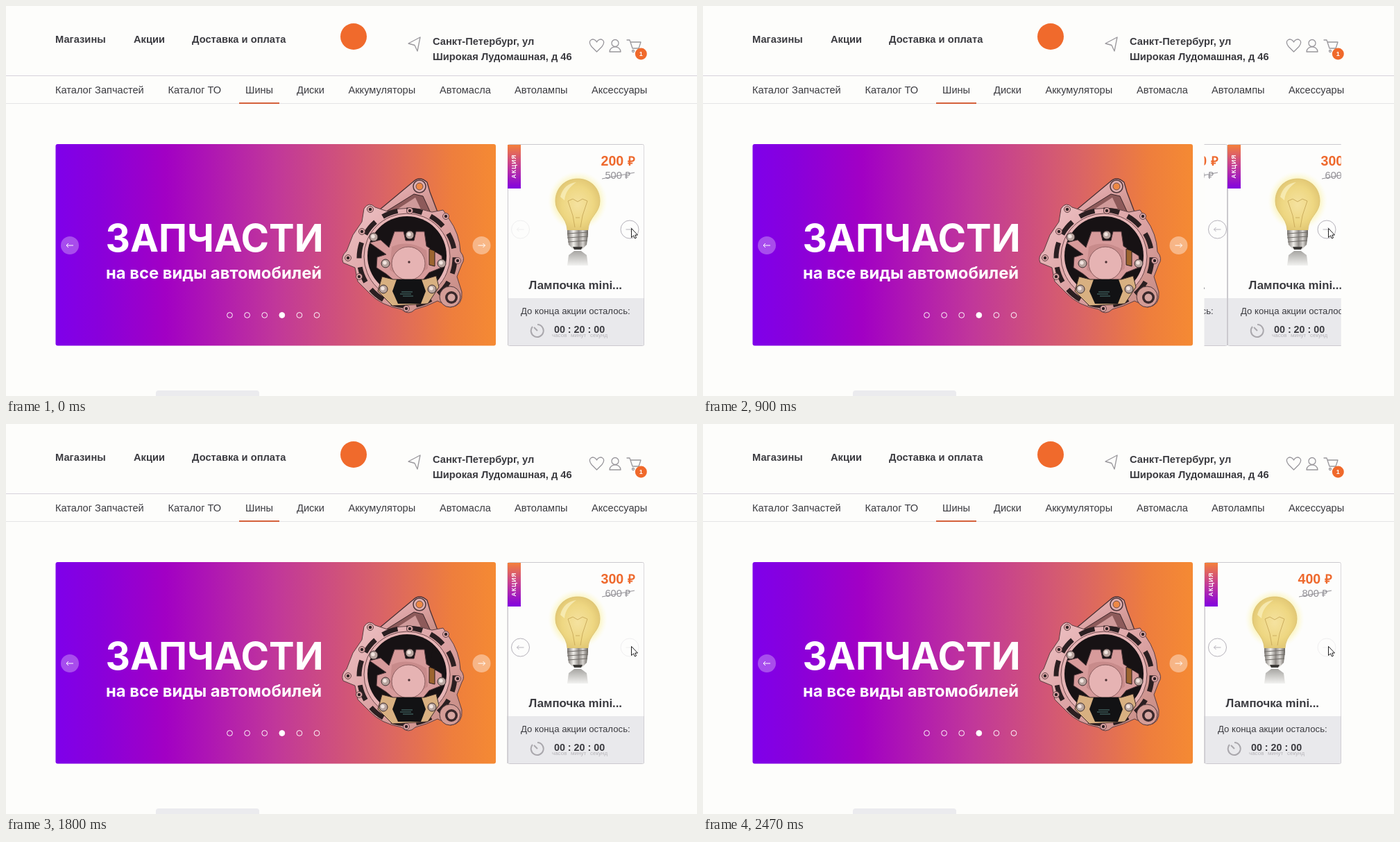
An HTML page for the animation above (2510 ms loop, 996 px wide and 562 px high).

```html
<!DOCTYPE html>
<html lang="ru">
<head>
<meta charset="utf-8">
<style>
html, body { margin: 0; width: 100%; height: 100%; overflow: hidden; background: #fdfdfb; }
svg { display: block; font-family: "Liberation Sans", Arial, sans-serif; fill: #3b3b40; }
.b { font-weight: 700; }
.line { fill: none; stroke: #98969b; stroke-width: 1.3; stroke-linejoin: round; stroke-linecap: round; }
.banner { font-family: Inter, sans-serif; font-weight: 700; fill: #fff; }
.ring { fill: none; stroke: #b5b2ba; }
</style>
</head>
<body>
<svg width="996" height="562" viewBox="0 0 996 562">
<defs>
  <linearGradient id="wide">
    <stop offset="0" stop-color="#7f00ea"/><stop offset=".1" stop-color="#8900db"/>
    <stop offset=".25" stop-color="#a200c4"/><stop offset=".5" stop-color="#c1379a"/>
    <stop offset=".74" stop-color="#d96367"/><stop offset=".9" stop-color="#ee7e3d"/>
    <stop offset="1" stop-color="#f58a33"/>
  </linearGradient>
  <linearGradient id="tall" x2="0" y2="1">
    <stop offset="0" stop-color="#f4803a"/><stop offset=".5" stop-color="#c23a98"/>
    <stop offset="1" stop-color="#8200e0"/>
  </linearGradient>
  <linearGradient id="metal">
    <stop offset="0" stop-color="#77736f"/><stop offset=".3" stop-color="#f0eeea"/>
    <stop offset=".55" stop-color="#8f8b87"/><stop offset=".75" stop-color="#d6d3cf"/>
    <stop offset="1" stop-color="#68645f"/>
  </linearGradient>
  <linearGradient id="fade" x2="0" y2="1">
    <stop offset="0" stop-color="#8b8985"/><stop offset="1" stop-color="#eeeeec"/>
  </linearGradient>
  <linearGradient id="body" x2="1" y2="1">
    <stop offset="0" stop-color="#efc3c6"/><stop offset=".5" stop-color="#dca3a4"/>
    <stop offset="1" stop-color="#c58a80"/>
  </linearGradient>
  <radialGradient id="glass">
    <stop offset="0" stop-color="#f5e2a0"/><stop offset=".7" stop-color="#eed782"/>
    <stop offset="1" stop-color="#e3c976"/>
  </radialGradient>
  <radialGradient id="glow">
    <stop offset=".72" stop-color="#fbf3b4" stop-opacity=".9"/>
    <stop offset="1" stop-color="#fdfbe0" stop-opacity="0"/>
  </radialGradient>
  <clipPath id="window"><path d="M722.5 198H919.7V490.5H722.5Z"/></clipPath>
  <path id="arrow" d="M5 0H-5M-5 0L-2 -3M-5 0L-2 3" fill="none"/>

  <g id="bulb">
    <circle cx="101" cy="82" r="43" fill="url(#glow)"/>
    <path d="M101 50C82 50 69 64 69 82C69 100 85 104 86 124H116C117 104 133 100 133 82C133 64 120 50 101 50Z" fill="url(#glass)" stroke="#d8bf70" stroke-width=".8"/>
    <path d="M76 76C79 63 88 56 99 55C90 61 83 69 82 81Z" fill="#fbf2c4" opacity=".7"/>
    <path d="M97 120L94 103L87 82L94 79L101 83L108 79L115 82L108 103L105 120M98 106H104" fill="none" stroke="#c3a354" stroke-width=".8"/>
    <path d="M86 124H116V130L114 145L108 151H94L88 145L86 130Z" fill="url(#metal)"/>
    <path d="M86 129L116 127M86 135L116 133M87 141L115 139" stroke="#6f6b67"/>
    <path d="M94 148H108L106 152H96Z" fill="#3c3a38"/>
    <path d="M96 154H106L114 160L116 175H86L88 160Z" fill="url(#fade)" opacity=".75"/>
  </g>
</defs>

<g id="page">
  <circle cx="501" cy="44" r="19" fill="#f06a2c"/>
  <path d="M0 100.5H996" stroke="#d6d2db"/>
  <path d="M0 140.5H996" stroke="#e5e4e6"/>
  <path d="M336 140H394" stroke="#d4603a" stroke-width="2"/>
  <g class="b" font-size="14.7">
    <text x="615" y="56">Санкт-Петербург, ул</text>
    <text x="615" y="78">Широкая Лудомашная, д 46</text>
  </g>
  <g class="line">
    <path d="M597 45L580 54L589 56.5L593 65Z"/>
    <path d="M851.5 66L844 58.5C836 49 848 44 851.5 52C855 44 867 49 859 58.5Z"/>
    <circle cx="878" cy="53.5" r="5"/>
    <path d="M870 66C870 56.5 886 56.5 886 66Z"/>
    <path d="M895 49H899L903 61H912L915 52H900"/>
    <circle cx="904" cy="65" r="1.5"/><circle cx="911" cy="65" r="1.5"/>
  </g>
  <circle cx="915.3" cy="69" r="8.5" fill="#f0692b"/>
  <text class="b" x="915.3" y="72.2" font-size="9" fill="#fff" text-anchor="middle">1</text>
  <path d="M216 562V558Q216 554 220 554H361Q365 554 365 558V562Z" fill="#ebebee"/>
</g>

<rect x="71.5" y="199" width="634.5" height="290.5" rx="3" fill="url(#wide)"/>
<g class="banner">
  <text x="143.5" y="354" font-size="54.9">ЗАПЧАСТИ</text>
  <text x="144" y="393" font-size="23.8">на все виды автомобилей</text>
</g>
<g id="dots" stroke="#fff"></g>
<g fill="#fff" stroke="#fff">
  <circle cx="92" cy="345" r="13" fill-opacity=".3" stroke="none"/>
  <circle cx="685.5" cy="345" r="13" fill-opacity=".4" stroke="none"/>
  <use href="#arrow" x="92" y="345"/>
  <use href="#arrow" transform="translate(685.5 345) scale(-1 1)"/>
</g>

<g id="alternator" stroke-linejoin="round">
  <path d="M526 304L586 254Q596 244 607 254L611 268L624 302Z" fill="url(#body)" stroke="#4a3034" stroke-width="1.3"/>
  <path d="M540 301L588 271L601 274L612 298Z" fill="#8d5a5a" stroke="#3d2629"/>
  <path d="M556 298L590 276L600 297Z" fill="#d09a9a"/>
  <circle cx="596" cy="260" r="9" fill="#e0b0b1" stroke="#4c3539" stroke-width="1.5"/>
  <circle cx="596" cy="260" r="5" fill="#ee8945" stroke="#6f4a45"/>
  <path d="M516 292Q523 281 532 290L550 296Q582 286 614 297L630 294L638 306Q654 328 655 354Q663 364 657 372L650 390L657 412Q659 432 641 434L622 425Q606 433 590 437Q580 447 570 437Q541 432 524 414L507 397L503 377L486 370Q482 361 491 353L500 330L513 311Z" fill="url(#body)" stroke="#5c3d41"/>
  <circle cx="578" cy="363" r="69" fill="none" stroke="#2b1f21" stroke-width="7" stroke-dasharray="23 13"/>
  <circle cx="578" cy="361" r="62" fill="#e6b4b5" stroke="#6d474a"/>
  <circle cx="578" cy="360" r="57" fill="#171214"/>
  <path d="M524 341L540 337L552 348L560 325H573L576 338H588L591 325H603L606 346L628 360L630 376L610 384L600 396H560L548 386L534 377L535 362L548 358Z" fill="#d79b9b" stroke="#50363a"/>
  <path d="M556 347Q580 336 606 352L608 378Q580 402 553 380Z" fill="#c88b8b"/>
  <circle cx="580" cy="371" r="24" fill="#e6b3b3" stroke="#8b5d5e"/>
  <path d="M615 322L630 340L627 358L611 351Z" fill="#171214"/>
  <path d="M610 350L618 353V375L610 373Z" fill="#9c652f" stroke="#2a1d1c"/>
  <path d="M542 390L558 394H603L620 389L624 405L608 429L557 432L536 411Z" fill="#d8b081" stroke="#3b2a27"/>
  <path d="M563 394H599L605 411L598 429H565L557 411Z" fill="#121214"/>
  <path d="M570 412H586M568 415H584M572 418H587" stroke="#4f7c78"/>
  <circle cx="640" cy="419" r="15" fill="#d39c96" stroke="#4e363a"/>
  <circle cx="642" cy="420" r="9" fill="#3a282b"/>
  <circle cx="642" cy="420" r="5.5" fill="#d5a5a0"/>
</g>

<g id="track" clip-path="url(#window)"><g id="cards"></g></g>
<g id="prev" class="ring"><circle cx="741.5" cy="322" r="13"/><use href="#arrow" x="741.5" y="322"/></g>
<g id="next" class="ring"><circle cx="899" cy="322" r="13"/><use href="#arrow" transform="translate(898.5 322) scale(-1 1)"/></g>
<path d="M901.5 320.5V333.5L904.5 330.8L906.5 335L908.5 334L906.7 330H910.5Z" fill="#fff" stroke="#222"/>
</svg>

<script>
const LOOP = 2510, PITCH = 197, SLIDE = 468, STARTS = [652, 1812];
const $ = id => document.getElementById(id);
const add = (id, markup) => $(id).insertAdjacentHTML('beforeend', markup);
const label = (x, y, size, text, extra = '') =>
  `<text x="${x}" y="${y}" font-size="${size}" ${extra}>${text}</text>`;

[[71, 'Магазины'], [184, 'Акции'], [268, 'Доставка и оплата']]
  .forEach(([x, text]) => add('page', label(x, 53, 14.7, text, 'class="b"')));

[[71, 'Каталог Запчастей'], [233.5, 'Каталог ТО'], [345, 'Шины'], [419, 'Диски'],
 [493.5, 'Аккумуляторы'], [625, 'Автомасла'], [733, 'Автолампы'], [844, 'Аксессуары']]
  .forEach(([x, text]) => add('page', label(x, 126, 14.6, text)));

for (let i = 0; i < 6; i++)
  add('dots', `<circle cx="${322.5 + 25.1 * i}" cy="445.5" r="3.9" fill="${i == 3 ? '#fff' : 'none'}"/>`);

// Bolts around the casing and over the inner plate
[[525, 293], [582, 295], [634, 303], [651, 367], [577, 436], [509, 390], [493, 363], [513, 325]]
  .forEach(([x, y]) => add('alternator',
    `<circle cx="${x}" cy="${y}" r="4.5" fill="#dba6a6" stroke="#66464a"/><circle cx="${x}" cy="${y}" r="2.2" fill="#2f2124"/>`));
[[530, 333], [582, 330], [547, 371], [628, 371], [544, 408], [614, 408]]
  .forEach(([x, y]) => add('alternator',
    `<circle cx="${x}" cy="${y}" r="6" fill="#b7a49e" stroke="#3c2c2e"/><circle cx="${x - 1}" cy="${y - 1}" r="2.7" fill="#f2e4df"/>`));
add('alternator', '<circle cx="581" cy="369" r="1.7" fill="#4a3033"/>');

const card = (price, oldPrice, i) => `<g transform="translate(${723 + PITCH * i} 199)">
  <rect x=".5" y=".5" width="196" height="290" rx="2" fill="#fdfdfc" stroke="#cbc9ce"/>
  <path d="M0 222H196V290H0Z" fill="#e9e9ec"/>
  <path d="M.5 222V290M196.5 222V290" stroke="#cbc9ce"/>
  <path d="M0 1H19V64H0Z" fill="url(#tall)"/>
  ${label(0, 0, 8.5, 'АКЦИЯ', 'class="b" fill="#fff" letter-spacing="1" text-anchor="middle" transform="translate(12 32) rotate(-90)"')}
  <use href="#bulb"/>
  <g fill="#ee692d">${label(134.5, 31, 19.6, price, 'class="b"')}${label(173, 31, 18, '₽', 'class="b"')}</g>
  <g fill="#929096">${label(140.5, 50, 14.6, oldPrice)}${label(169, 50, 14, '₽')}</g>
  <path d="M136 50L183 41" stroke="#929096"/>
  ${label(30.5, 209, 16.8, 'Лампочка mini...', 'class="b"')}
  ${label(19, 245, 13.2, 'До конца акции осталось:')}
  ${label(67, 272, 14.3, '00 : 20 : 00', 'class="b"')}
  <g fill="#b6b4b9">${label(64, 277.5, 8, 'часов')}${label(91, 277.5, 8, 'минут')}${label(119, 277.5, 8, 'секунд')}</g>
  <path d="M43 260A9 9 0 1 1 36 263M43 269L38 264" fill="none" stroke="#aaa8ad" stroke-width="2"/>
</g>`;
[[200, 500], [300, 600], [400, 800]].forEach(([price, old], i) => add('cards', card(price, old, i)));

const clamp = v => Math.min(1, Math.max(0, v));

// The CSS "ease" curve, solved by bisection
function ease(x) {
  let low = 0, high = 1, s;
  for (let i = 0; i < 20; i++) {
    s = (low + high) / 2;
    if (.75 * s - .75 * s * s + s ** 3 < x) low = s; else high = s;
  }
  return .3 * s * (1 - s) ** 2 + 3 * s * s * (1 - s) + s ** 3;
}

function draw() {
  const t = performance.now() % LOOP;
  const moved = STARTS.reduce((sum, start) => sum + ease(clamp((t - start) / SLIDE)), 0);
  $('cards').setAttribute('transform', `translate(${(-PITCH * moved).toFixed(2)} 0)`);
  $('prev').setAttribute('opacity', .2 + .8 * clamp((t - 690) / 200));
  $('next').setAttribute('opacity', t < 1790 ? 1 : .2);
  requestAnimationFrame(draw);
}
draw();
</script>
</body>
</html>
```
